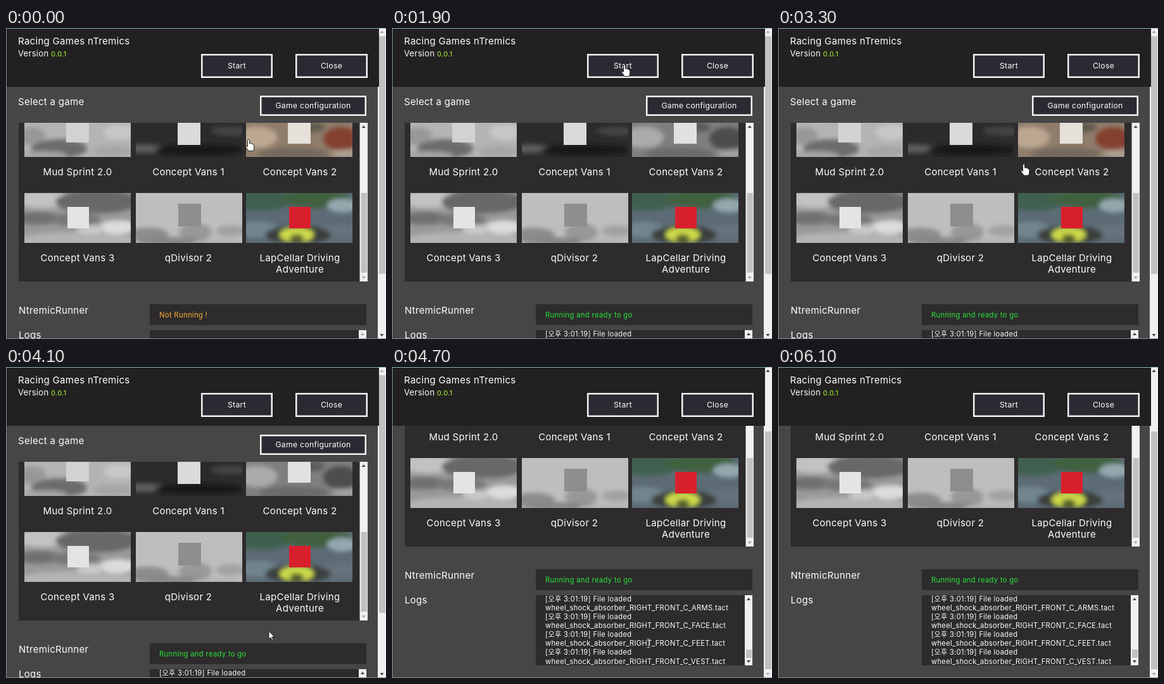
Animation, 600 px wide and 492 px high, one loop 6.3 s. Source, as an HTML page:

```html
<!DOCTYPE html>
<html lang="en">
<head>
<meta charset="utf-8">
<style>
  html, body { margin: 0; width: 100%; height: 100%; overflow: hidden; background: #474546; }
  svg { display: block; }
  text { font: 15px Inter, "Noto Sans CJK KR", sans-serif; fill: #fff; letter-spacing: .3px; white-space: pre; }
</style>
</head>
<body>
<svg id="stage" width="600" height="492"></svg>
<script>
const LOOP = 6300, STEP = 100, SCROLL = 117;
const PANEL = '#2d2b2c', TRACK = '#f0f0f0', THUMB = '#c1c1c1', DARK = '#404040', FAINT = '#a8a8a8';

const rect = (x, y, w, h, fill, extra = '') =>
  `<rect x="${x}" y="${y}" width="${w}" height="${h}" fill="${fill}" ${extra}/>`;
const text = (x, y, s, size = 15, fill = '#fff', anchor = 'start') =>
  `<text x="${x}" y="${y}" text-anchor="${anchor}" style="font-size:${size}px;fill:${fill}">${s}</text>`;
const box = (x, y, w, h, body) =>
  `<svg x="${x}" y="${y}" width="${w}" height="${h}" overflow="hidden">${body}</svg>`;
const button = (x, y, w, h, label) =>
  rect(x + 1.25, y + 1.25, w - 2.5, h - 2.5, '#2a2a32', 'stroke="#f4f4f4" stroke-width="2.5"') +
  text(x + w / 2, y + h / 2 + 4, label, 12.2, '#fff', 'middle');

function scrollbar(x, y, w, h, thumbY, thumbH, up, down) {
  const c = x + w / 2;
  return rect(x, y, w, h, TRACK) + rect(x + 2, thumbY, w - 3, thumbH, THUMB) +
    `<path fill="${up}" d="M${c - 3} ${y + 8}h6l-3-4z"/>` +
    `<path fill="${down}" d="M${c - 3} ${y + h - 8}h6l-3 4z"/>`;
}

// Each card: column centre, left, top, title lines, backdrop, blurred blobs (cx cy rx ry colour), emblem (x y size colour)
const cards = [
  [113, 29, 125, ['Mud Sprint 2.0'], '#b4b4b4',
    ['12 46 22 14 #989898', '55 66 44 15 #6c6c6c', '28 76 40 6 #a4a4a4', '140 70 32 9 #a6a6a6', '150 40 25 12 #c8c8c8'], [66, 20, 36, '#d2d2d2']],
  [288, 205, 125, ['Concept Vans 1'], '#2b2b2b',
    ['12 66 32 7 #5d5d5d', '150 38 32 7 #454545', '100 68 70 8 #191919'], [66, 24, 36, '#dadada']],
  [464, 379, 125, ['Concept Vans 2'], '#8f7c6b',
    ['18 48 32 17 #bca892', '150 50 28 18 #84402f', '75 74 55 10 #75695f', '158 74 24 6 #b0a295', '100 32 25 8 #615b4d'], [66, 22, 36, '#e6e0da']],
  [113, 29, 261, ['Concept Vans 3'], '#999',
    ['30 10 46 14 #c2c2c2', '115 14 66 18 #686868', '22 40 36 10 #6f6f6f', '80 42 40 10 #777', '84 76 100 14 #b4b4b4', '148 54 30 11 #dcdcdc', '104 58 22 7 #cacaca'], [68, 22, 34, '#e4e4e4']],
  [288, 205, 261, ['qDivisor 2'], '#bebebe',
    ['20 66 32 11 #8c8c8c', '94 62 26 14 #989898', '150 60 24 9 #a2a2a2', '60 76 60 6 #858585', '130 78 40 5 #b2b2b2'], [67, 17, 36, '#8e8e8e']],
  [464, 379, 261, ['LapCellar Driving', 'Adventure'], '#5c6b75',
    ['25 10 50 18 #40604f', '110 9 55 15 #3f6140', '152 20 24 11 #93a7ad', '18 58 34 13 #71858f', '148 60 32 11 #66727c', '82 66 52 14 #3b413c', '80 66 27 12 #cdda48', '80 72 11 7 #59602f'], [68, 22, 34, '#d8202c']],
];

function card([mid, x, y, lines, back, blobs, [ex, ey, size, tone]], grey) {
  const shapes = blobs.map(b => {
    const [cx, cy, rx, ry, fill] = b.split(' ');
    return `<ellipse cx="${cx}" cy="${cy}" rx="${rx}" ry="${ry}" fill="${fill}"/>`;
  }).join('');
  const photo = rect(0, 0, 168, 79, back) + `<g filter="url(#soft)">${shapes}</g>` + rect(ex, ey, size, size, tone);
  return `<g style="filter:${grey ? 'grayscale(1)' : 'none'}">${box(x, y, 168, 79, photo)}</g>` +
    lines.map((s, i) => text(mid, y + 108 + i * 17.5, s, 15, '#fff', 'middle')).join('');
}

// Pointer path: time, x, y
const path = [
  [0, 383, 176], [400, 383, 176], [600, 383, 178], [800, 383, 178], [1100, 382, 185], [1200, 382, 185],
  [1300, 367, 58], [2300, 367, 58], [2400, 369, 58], [2900, 368, 63], [3000, 368, 63],
  [3700, 415, 417], [4100, 415, 418], [4200, 414, 420], [4600, 414, 431],
  [4700, 405, 437], [5000, 405, 437], [5500, 365, 62], [LOOP, 365, 62],
];

function pointerAt(t) {
  const i = path.findIndex(p => p[0] > t);
  const [t0, x0, y0] = path[i - 1], [t1, x1, y1] = path[i], k = (t - t0) / (t1 - t0);
  return [x0 + (x1 - x0) * k, y0 + (y1 - y0) * k];
}

const shapes = {
  arrow: 'M0 0v12.5l3-2.8 2 4.6 2-.9-2-4.5h4z',
  hand: 'M-1.5 1.5q1.5-2.5 3 0v5q2-1 2.8.5 2-.6 2.5 1 2-.3 2 2v3q0 3-1.6 5.5h-7l-4.4-6q-1-2.2 1-2.2l1.7 1.6z',
};

function cursor(kind, x, y) {
  const style = kind === 'beam'
    ? 'd="M-3-7h2l1 1 1-1h2M0-6V6M-3 7h2l1-1 1 1h2" fill="none" stroke="#aaa"'
    : `d="${shapes[kind]}" fill="#fff" stroke="#111" stroke-width=".9"`;
  return `<path transform="translate(${x} ${y})" ${style}/>`;
}

const log = ['ARMS', 'FACE', 'FEET', 'VEST'].flatMap(part =>
  ['[오후 3:01:19] File loaded', `wheel_shock_absorber_RIGHT_FRONT_C_${part}.tact`]);

function scene(t) {
  const scroll = t >= 4200 ? SCROLL : 0, ready = t >= 1900;
  const [x, y] = pointerAt(t);
  const onStart = x > 308 && x < 421 && y > 42 && y < 78;
  const onList = y > Math.max(93, 150 - scroll) && y < 401 - scroll;
  const onThirdCard = !scroll && onList && x > 379 && y < 250;
  const kind = t >= 4700 && y > 361 ? 'beam' : onStart || onList ? 'hand' : 'arrow';

  const list = rect(20, 150, 539, 251, PANEL) +
    box(0, 150, 600, 251, `<g transform="translate(0 -150)">${
      cards.map((c, i) => card(c, !(i === 5 || i === 2 && onThirdCard))).join('')}</g>`) +
    scrollbar(558.5, 150, 12.5, 251, 261, 126, DARK, FAINT);

  const status = rect(227, 437, 342, 33, PANEL) + (ready
    ? text(242, 458, 'Running and ready to go', 11.3, '#2be43a')
    : text(242, 458, 'Not Running !', 11.3, '#ffae35'));

  const logs = rect(227, 478, 342, 111, PANEL) + (ready
    ? box(227, 478, 330, 111, log.map((s, i) => text(15, 9.5 + i * 14.15, s, 11.2)).join(''))
    : '') +
    scrollbar(557, 478, 12, 111, 564, ready ? 13 : 0, ready ? DARK : FAINT, ready ? DARK : FAINT);

  const page = text(19, 122, 'Select a game') + button(401, 107, 168, 32, 'Game configuration') +
    list + text(20, 452, 'NtremicRunner') + status + text(20, 491, 'Logs') + logs;

  const header = rect(1, 0, 588, 93, '#222021') + text(19, 26, 'Racing Games nTremics') +
    text(19, 45, 'Version', 13) + text(71, 45, '0.0.1', 11, '#adff2f') +
    button(308, 41, 113, 38, 'Start') + button(457, 41, 114, 38, 'Close');

  return '<defs><filter id="soft" x="-20%" y="-20%" width="140%" height="140%"><feGaussianBlur stdDeviation="3.5"/></filter></defs>' +
    rect(0, 0, 600, 492, '#474546') + `<g transform="translate(0 ${-scroll})">${page}</g>` +
    scrollbar(587, 0, 13, 492, scroll ? 102 : 13, 376, scroll ? DARK : FAINT, scroll ? FAINT : DARK) + header +
    rect(0, 0, 1, 492, '#7f9698') + rect(0, 0, 600, 1, '#8fb4b3') + rect(0, 491, 600, 1, '#879391') +
    (t < 5600 ? cursor(kind, x, y) : '');
}

const stage = document.getElementById('stage');
let shown = -1;
function tick() {
  const t = Math.floor(performance.now() % LOOP / STEP) * STEP;
  if (t !== shown) stage.innerHTML = scene(shown = t);
  requestAnimationFrame(tick);
}
tick();
</script>
</body>
</html>
```
